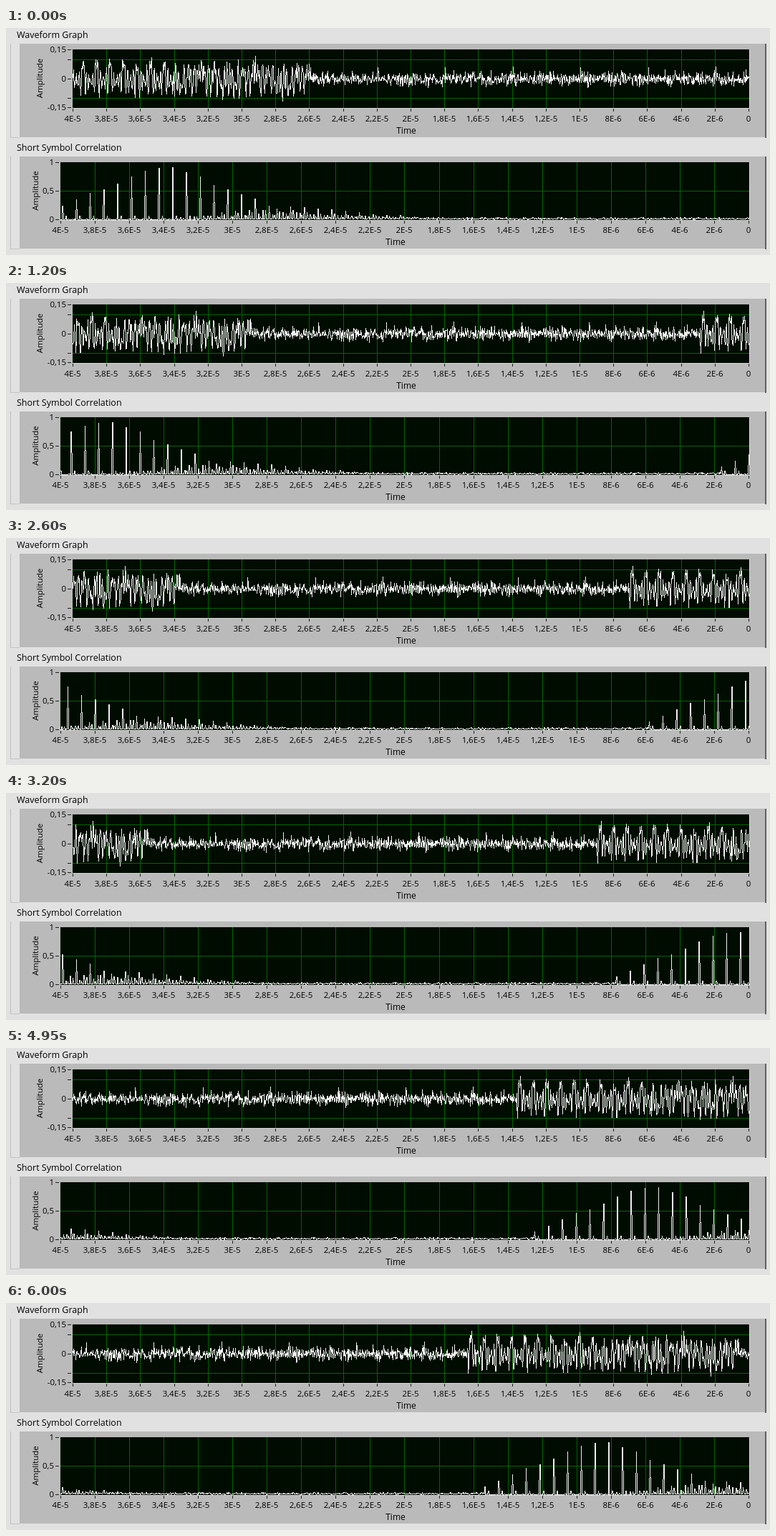
An HTML page with a canvas for the animation above (6.1 s loop, 1067 px wide and 318 px high).

```html
<!DOCTYPE html>
<html lang="en">
<head>
<meta charset="utf-8">
<title>Waveform and correlation</title>
<style>
  html, body { margin: 0; width: 100%; height: 100%; overflow: hidden; background: #e1e1e1; }
  svg, canvas { position: absolute; left: 0; top: 0; width: 1067px; height: 318px; }
  text { font-family: "Open Sans", "Noto Sans", sans-serif; font-size: 11.5px; fill: #000; }
  .title { font-size: 12.5px; }
  .time { font-size: 12px; }
</style>
</head>
<body>
<svg id="panels" viewBox="0 0 1067 318"></svg>
<canvas id="traces" width="1067" height="318"></canvas>
<script>
// Signal time is counted in samples; the traces hold two points per sample.
const RATE = 2, SAMPLES = 800, PERIOD = 852, LEAD = 40;
const svg = document.getElementById('panels');
const ctx = document.getElementById('traces').getContext('2d');

const wave = {
  title: 'Waveform Graph', titleY: 14, left: 93, right: 1037, top: 30, bottom: 111,
  min: -0.15, max: 0.15, panel: [22, 153], labelX: 84, nameX: 51, tickY: 131, timeX: 559, timeY: 148,
  ticks: [[0.15, '0,15'], [0.1], [0, '0'], [-0.1], [-0.15, '-0,15']], grid: [0.1, -0.1]
};
const corr = {
  title: 'Short Symbol Correlation', titleY: 172, left: 76, right: 1037, top: 188, bottom: 268,
  min: 0, max: 1, panel: [180, 309], labelX: 67, nameX: 45, tickY: 287, timeX: 544, timeY: 304,
  ticks: [[1, '1'], [0.5, '0,5'], [0, '0']], grid: [0.5]
};

function add(tag, attrs, content) {
  const el = document.createElementNS('http://www.w3.org/2000/svg', tag);
  for (const key in attrs) el.setAttribute(key, attrs[key]);
  if (content) el.textContent = content;
  svg.append(el);
}
const rect = (x, y, width, height, fill) =>
  add('rect', { x, y, width, height, fill, 'shape-rendering': 'crispEdges' });
const label = (x, y, content, anchor, more) =>
  add('text', { x, y, 'text-anchor': anchor, ...more }, content);
const yOf = (g, v) => Math.round(g.bottom - (v - g.min) / (g.max - g.min) * (g.bottom - g.top));

function drawPanel(g) {
  const [top, bottom] = g.panel;
  label(15, g.titleY, g.title, 'start', { class: 'title' });
  rect(6, top, 1, bottom - top, '#bcbcbc');
  rect(6, bottom, 13, 1, '#c4c4c4');
  rect(19, top, 1042, bottom - top, '#bababa');
  rect(1060, top, 2, bottom - top + 1, '#606060');

  const width = g.right - g.left, height = g.bottom - g.top + 1;
  rect(g.left, g.top, width + 1, height, '#000c00');
  rect(g.right + 1, g.top, 1, height, '#dedede');
  rect(g.left, g.bottom + 1, width + 2, 1, '#d2d2d2');

  for (let i = 0; i <= 20; i++) {
    const x = Math.ceil(g.left + width * i / 20 - 0.5), n = 40 - 2 * i;
    if (i > 0 && i < 20) rect(x, g.top, 1, height, '#006400');
    rect(x, g.bottom + 2, 1, 4, '#202020');
    const text = n >= 10 ? String(n / 10).replace('.', ',') + 'E-5' : n ? n + 'E-6' : '0';
    label(x, g.tickY, text, 'middle');
  }
  for (const v of g.grid) rect(g.left, yOf(g, v), width + 1, 1, '#006400');
  for (const [v, text] of g.ticks) {
    rect(g.left - 7, yOf(g, v), 5, 1, '#202020');
    if (text) label(g.labelX, yOf(g, v) + 4, text, 'end');
  }
  const midY = (g.top + g.bottom) / 2;
  label(g.nameX, midY, 'Amplitude', 'middle', { transform: `rotate(-90 ${g.nameX} ${midY})` });
  label(g.timeX, g.timeY, 'Time', 'middle', { class: 'time' });
}

function random(n) {
  let h = Math.imul(n + 977, 0x9e3779b1);
  h = Math.imul(h ^ h >>> 15, 0x85ebca6b);
  h = Math.imul(h ^ h >>> 13, 0xc2b2ae35);
  return ((h ^ h >>> 16) >>> 0) / 4294967296;
}
const noise = n => random(n) + random(n + 5000) + random(n + 9000) - 1.5;

// OFDM training symbols: signs of the carriers, summed as a real signal.
const SHORT = '+-+--+0--++++';
const LONG = '++--++-+-++++++--++-+-++++' + '0' + '+--++-+-+-----++--+-+-++++';
const sign = c => c === '+' ? 1 : c === '-' ? -1 : 0;

function training(carriers, spacing, n, quadrature) {
  const half = (carriers.length - 1) / 2;
  let sum = 0;
  [...carriers].forEach((c, i) => {
    const angle = 2 * Math.PI * (i - half) * spacing * n / 64;
    sum += sign(c) * (Math.cos(angle) - quadrature * Math.sin(angle));
  });
  return sum / 64;
}

function amplitude(point) {
  const n = point / RATE;
  if (n < 160) return 0.85 * training(SHORT, 4, n, 1) + 0.03 * noise(point);
  if (n <= 320) return 0.6 * training(LONG, 1, n, 0) + 0.03 * noise(point);
  if (n % 80 === 1) return 0.055 + 0.008 * random(point);
  return 0.035 * noise(point);
}

const PEAKS = [.14, .24, .35, .46, .53, .62, .75, .85, .9, .91, .83, .75, .6, .53, .44, .36, .24];
const ECHOES = { 0: .55, 4: .5, 6: .35, 9: 1, 12: .7 };

function correlation(point) {
  const n = Math.floor(point / RATE);
  const offset = n - 26, index = Math.floor(offset / 16), phase = (offset % 16 + 16) % 16;
  if (phase === 0 && PEAKS[index]) return PEAKS[index];
  const floor = n > 26 && n < 300 ? 0.008 * random(n) : 0.032 * random(n) ** 2 + 0.006;
  const rise = (n - 160) / 130, fall = (500 - n) / 200;
  const echo = Math.max(0, Math.min(rise, fall, 1)) * (ECHOES[phase] || 0.08);
  const side = index >= 0 && index < 17 && phase === 4 ? 0.06 : 0;
  return Math.max(floor, side, 0.25 * echo * (0.65 + 0.35 * random(n + 300)));
}

const table = f => Array.from({ length: PERIOD * RATE }, (_, point) => f(point));
wave.data = table(amplitude);
corr.data = table(correlation);

function pixelLine(x0, y0, x1, y1) {
  const steps = Math.max(Math.abs(x1 - x0), Math.abs(y1 - y0), 1);
  for (let i = 0; i <= steps; i++) {
    ctx.fillRect(Math.round(x0 + (x1 - x0) * i / steps), Math.round(y0 + (y1 - y0) * i / steps), 1, 1);
  }
}

function drawTrace(g, shift) {
  const points = SAMPLES * RATE;
  let lastX, lastY;
  for (let i = 0; i <= points; i++) {
    const x = Math.round(g.left + (g.right - g.left) * i / points);
    const y = yOf(g, g.data[(i + (shift + LEAD) * RATE) % g.data.length]);
    if (i) pixelLine(lastX, lastY, x, y);
    lastX = x;
    lastY = y;
  }
}

// Hold of each step in units of 50 ms, about one second per group.
const HOLDS = [...[
  '2', '33233233', '322322233', '32323233', '332222333', '322233233', '3222'
].join('')].map(Number);
// Scroll, in samples, reached at some steps.
const SCROLL = [[0, 0], [9, 70], [16, 124], [25, 192], [31, 230], [39, 287], [47, 345]];
const LOOP = 6100;

function stepAt(time) {
  let step = 0, end = HOLDS[0] * 50;
  while (time >= end && step < HOLDS.length - 1) end += HOLDS[++step] * 50;
  return step;
}
function scrollAt(step) {
  const i = Math.max(1, SCROLL.findIndex(([s]) => s >= step));
  const [s0, v0] = SCROLL[i - 1], [s1, v1] = SCROLL[i];
  return Math.round(v0 + (v1 - v0) * (step - s0) / (s1 - s0));
}

let shown = -1;
function render(now) {
  const step = stepAt(now % LOOP);
  if (step !== shown) {
    shown = step;
    ctx.clearRect(0, 0, 1067, 318);
    ctx.fillStyle = '#f0f0f0';
    drawTrace(wave, scrollAt(step));
    drawTrace(corr, scrollAt(step));
  }
}

drawPanel(wave);
drawPanel(corr);
const start = performance.now();
render(0);
requestAnimationFrame(function tick() {
  render(performance.now() - start);
  requestAnimationFrame(tick);
});
</script>
</body>
</html>
```
